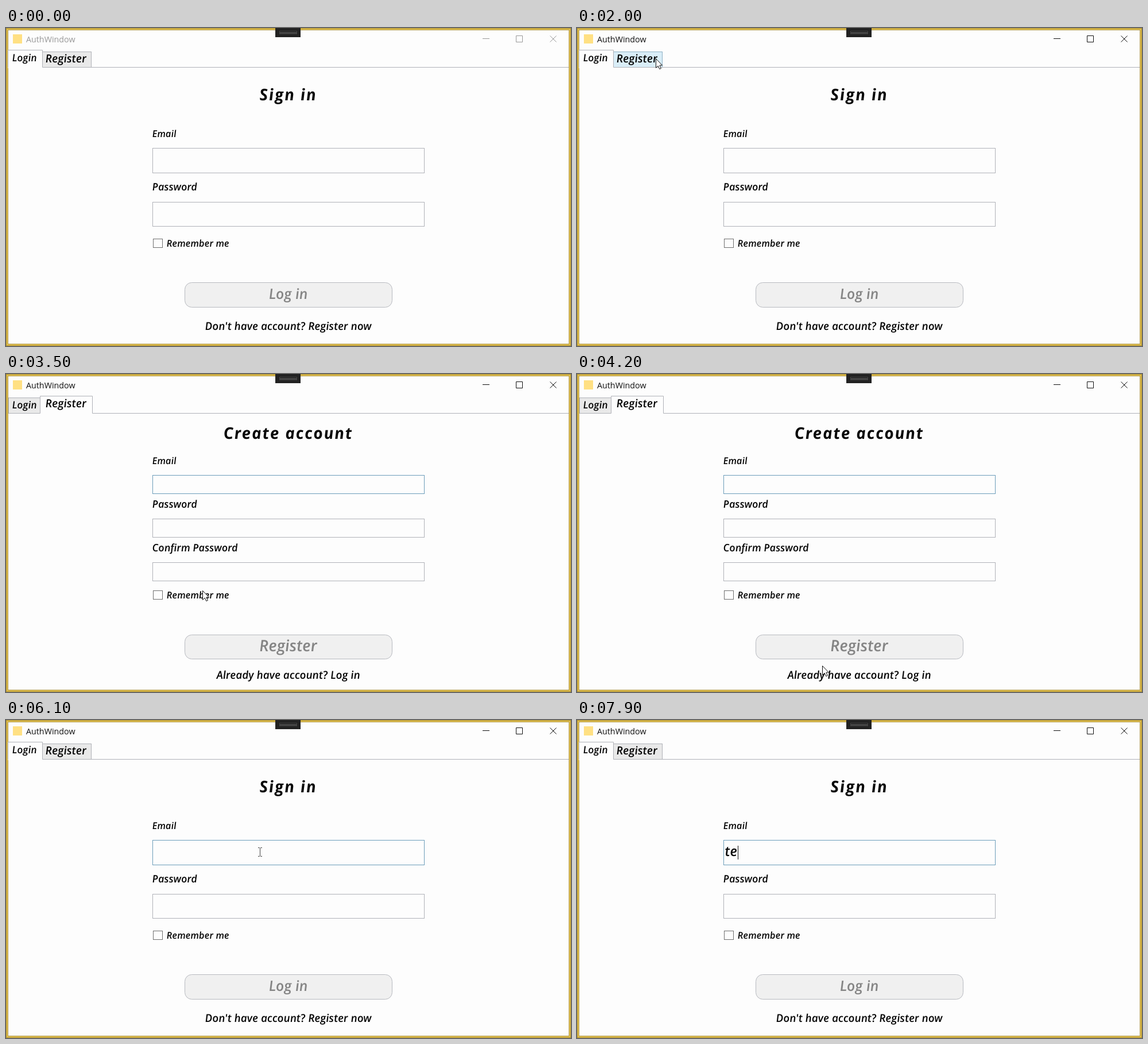
These frames come from a looping animation (984x554 px, 8 s). An HTML page:

```html
<!DOCTYPE html>
<html lang="en">
<head>
<meta charset="utf-8">
<title>AuthWindow</title>
<style>
  html, body { margin: 0; width: 100%; height: 100%; overflow: hidden; background: #fdfdfd; }
  svg { display: block; width: 984px; height: 554px; }
  text { font-family: "Open Sans", "Noto Sans", sans-serif; white-space: pre; }
  /* Soften the italic slant to a handwritten one */
  .hand, .heading {
    font-style: italic; font-weight: 600;
    transform-box: fill-box; transform-origin: 0 75%; transform: skewX(5deg);
  }
  .heading { font-weight: 700; letter-spacing: 1.8px; }
</style>
</head>
<body>
<svg id="stage" viewBox="0 0 984 554"></svg>
<script>
const LOOP = 8000, STEP = 100;
const PAPER = '#fdfdfd', FILL = '#f0f0f0', GRAY = '#b0b2b8', BLUE = '#6c9dba';
const stage = document.getElementById('stage');

const rect = (x, y, w, h, fill, stroke = 'none', r = 0) =>
  `<rect x="${x}" y="${y}" width="${w}" height="${h}" rx="${r}" fill="${fill}" stroke="${stroke}"/>`;
const path = (d, stroke, fill = 'none') => `<path d="${d}" stroke="${stroke}" fill="${fill}"/>`;
const text = (s, x, y, size, { fill = '#080808', anchor = 'start', cls = 'hand' } = {}) =>
  `<text x="${x}" y="${y}" font-size="${size}" fill="${fill}" text-anchor="${anchor}" class="${cls}">${s}</text>`;
const centered = (s, y, size, options) => text(s, 492, y, size, { anchor: 'middle', ...options });

const pages = {
  login: {
    heading: ['Sign in', 126],
    fields: [['Email', 16.5, 190, 209, 43], ['Password', 18, 283, 303, 42]],
    checkY: 367,
    button: ['Log in', 443, 43, 472, 25],
    footer: ["Don't have account? Register now", 526, 19]
  },
  register: {
    heading: ['Create account', 113],
    fields: [['Email', 16.5, 157, 176, 32], ['Password', 18, 233, 252, 32], ['Confirm Password', 18, 309, 328, 32]],
    checkY: 377,
    button: ['Register', 454, 42, 483, 27.5],
    footer: ['Already have account? Log in', 531, 19]
  }
};

// Pointer hot spot: time, x, y
const pointerKeys = [
  [700, 480, 554], [1300, 152, 78], [1500, 152, 78], [1700, 141, 58], [1900, 141, 58], [2000, 137, 53],
  [2800, 137, 53], [3700, 400, 470], [4200, 427, 508], [4500, 430, 520],
  [5300, 430, 520], [5500, 429, 462], [6100, 442, 230], [7700, 442, 230]
];

function pointerAt(t) {
  const i = pointerKeys.findIndex(key => key[0] >= t);
  if (t < 700 || i < 0) return null;
  const [t1, x1, y1] = pointerKeys[i];
  const [t0, x0, y0] = pointerKeys[Math.max(0, i - 1)];
  const u = t1 > t0 ? (t - t0) / (t1 - t0) : 1;
  return { x: x0 + (x1 - x0) * u, y: y0 + (y1 - y0) * u };
}

const inside = (p, x, y, w, h) => p && p.x >= x && p.x <= x + w && p.y >= y && p.y <= y + h;

function caretVisible(t) {
  if (t >= 7800) return true;
  if (t >= 6300) return t < 6700 || (t >= 7200 && t < 7700);
  return t >= 2700 && t < 5400 && Math.floor((t - 2700) / 500) % 2 === 0;
}

function frame(active) {
  const ink = active ? '#111' : '#999';
  return rect(0, 0, 984, 554, '#a98c2c') + rect(1, 1, 982, 552, '#dfbe50') +
    rect(3, 3, 978, 548, '#b39b48') + rect(4, 4, 976, 546, PAPER) +
    rect(469, 0, 44, 16, '#222') + rect(476.5, 5.5, 30, 5, 'none', '#444') + path('M477 8.5h29', '#777') +
    rect(12, 11, 16, 16, '#ffe083') +
    text('AuthWindow', 35, 25, 14.3, { fill: ink, cls: '' }) +
    path('M830 18.5h12M888.5 13.5h11v11h-11zM947.5 13.5l11 11m0 -11l-11 11', ink);
}

function tabs(isLogin, pointer) {
  const line = path('M4 68.5H980', GRAY);
  const tab = (x, w, selected) => {
    if (selected) return rect(x, 38, w, 32, PAPER) + path(`M${x} 68.5V38.5h${w}v30`, GRAY);
    const hover = inside(pointer, x, 41, w, 27);
    return rect(x, 41.5, w, 27, hover ? '#d9edf7' : '#e9e9e9', hover ? '#8fb2c6' : GRAY);
  };
  const shapes = isLogin
    ? tab(63.5, 85, false) + line + tab(3.5, 60, true)
    : tab(4.5, 55, false) + line + tab(59.5, 91, true);
  return shapes + text('Login', 11, isLogin ? 58 : 60, 17.5) + text('Register', 69, isLogin ? 60 : 58, 19.5);
}

function form(page, pointer, focused) {
  const [button, buttonY, buttonH, buttonBase, buttonSize] = page.button;
  const fields = page.fields.map(([label, size, base, y, h], i) => {
    const lit = (i === 0 && focused) || inside(pointer, 255, y, 473, h);
    return text(label, 255, base, size) + rect(255.5, y + .5, 473, h, PAPER, lit ? BLUE : GRAY);
  }).join('');
  return centered(page.heading[0], page.heading[1], 28, { cls: 'heading' }) + fields +
    rect(256.5, page.checkY + .5, 16, 15, PAPER, '#707070') +
    text('Remember me', 280, page.checkY + 14, 16.5) +
    rect(311.5, buttonY + .5, 361, buttonH, FILL, '#b8bac0', 12) +
    centered(button, buttonBase, buttonSize, { fill: '#858585' }) +
    centered(...page.footer);
}

function cursor(pointer, overField) {
  if (!pointer) return '';
  const shape = overField
    ? path('M-3 -7.5h2.5l1 1 1 -1H4M.5 -7V7M-3 7.5h2.5l1 -1 1 1H4', '#444')
    : path('M.5 .5V16.5L4.2 13L6.8 18.6L9.4 17.4L6.9 12H11.5Z', '#111', '#fff');
  return `<g transform="translate(${Math.round(pointer.x)} ${Math.round(pointer.y)})">${shape}</g>`;
}

function render(now) {
  const t = Math.floor((now % LOOP) / STEP) * STEP;
  const isLogin = t < 2100 || t >= 5600;
  const page = isLogin ? pages.login : pages.register;
  const pointer = pointerAt(t);
  const focused = (t >= 2100 && t < 5400) || t >= 6300;
  const overField = page.fields.some(([, , , y, h]) => inside(pointer, 255, y, 473, h));
  const typed = 'te'.slice(0, t >= 7900 ? 2 : t >= 7800 ? 1 : 0);
  const caretX = [258.5, 267.5, 280.5][typed.length];
  const caret = caretVisible(t) ? path(`M${caretX} ${isLogin ? '219V243' : '181V204'}`, '#111') : '';

  stage.innerHTML = frame(t >= 700) + tabs(isLogin, pointer) + form(page, pointer, focused) +
    text(typed, 258, 237, 24) + caret + cursor(pointer, overField);
  requestAnimationFrame(render);
}
render(performance.now());
</script>
</body>
</html>
```
